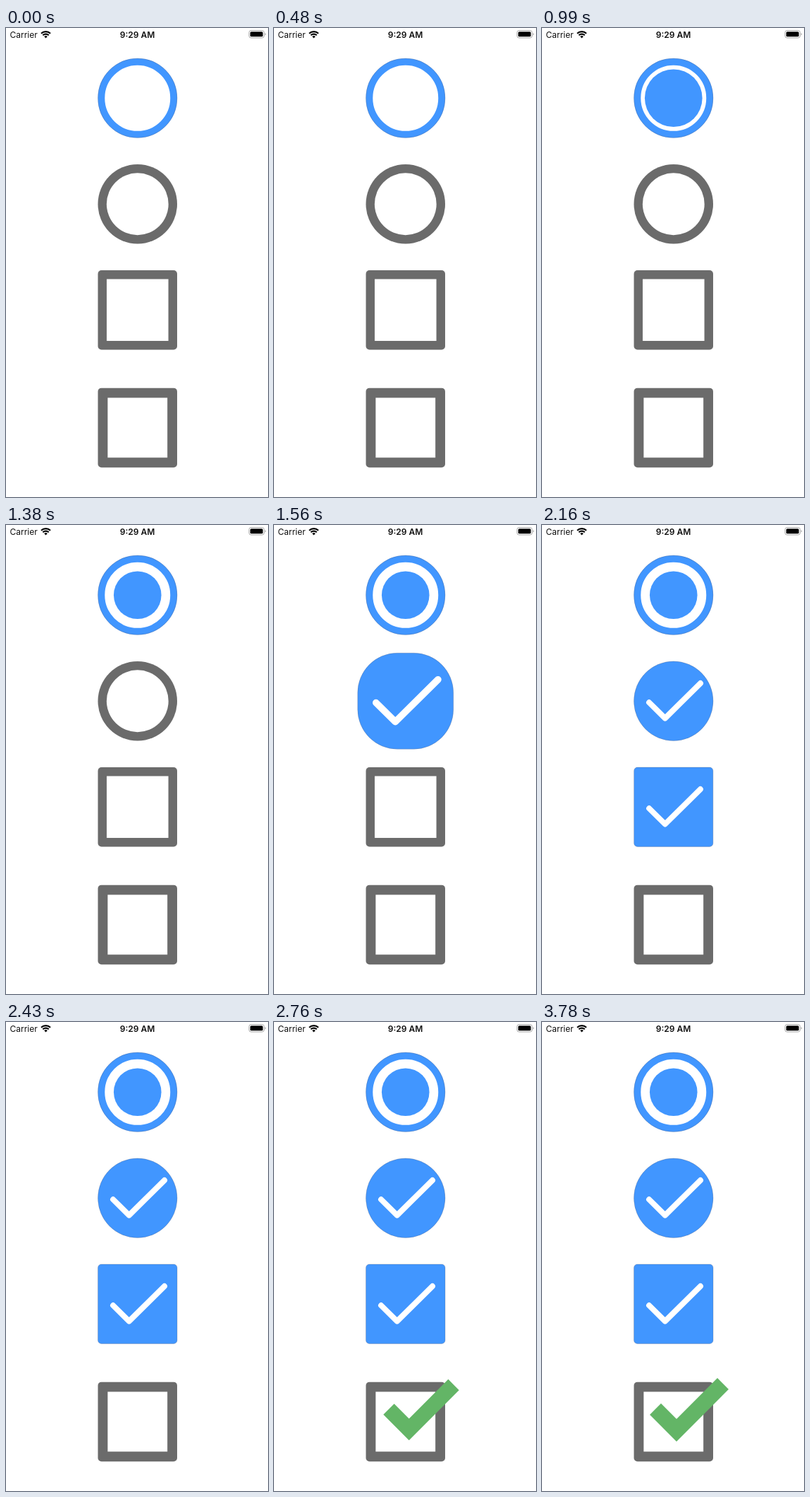
Write an HTML page that moves like this. It is 372 px wide and 664 px high and loops after 3.81 s.

```html
<!DOCTYPE html>
<html lang="en">
<head>
<meta charset="utf-8">
<title>Checkboxes</title>
<style>
  html, body { margin: 0; width: 100%; height: 100%; overflow: hidden; background: #fff; }
  svg { display: block; width: 372px; height: 664px; }
  text { font: 12px Inter, "Liberation Sans", sans-serif; fill: #111; }
  .gray { fill: #6b6b6b; }
  .blue { fill: #4196ff; }
  .edge { stroke: #556; stroke-opacity: .45; stroke-width: .6; }
  .tick { fill: none; stroke: #fff; stroke-width: 8; stroke-linecap: round; stroke-linejoin: round; }
</style>
</head>
<body>
<svg viewBox="0 0 372 664">
  <text x="5.5" y="13.5">Carrier</text>
  <text x="186.5" y="13.5" text-anchor="middle" font-weight="600" style="font-weight:600">9:29 AM</text>
  <g fill="none" stroke="#000" stroke-width="2.2">
    <path d="M50 7.8A9.2 9.2 0 0 1 63 7.8M52.3 10.3A6 6 0 0 1 60.7 10.3"/>
    <path d="M56.5 14.4L54.2 12A3.3 3.3 0 0 1 58.8 12Z" fill="#000" stroke="none"/>
  </g>
  <rect x="345" y="3.5" width="21.5" height="10.5" rx="3" fill="none" stroke="#aaa"/>
  <rect x="346.7" y="5.2" width="18" height="7.1" rx="1.6"/>
  <path d="M367.8 7v3.6q1.4-.5 1.4-1.8t-1.4-1.8z" fill="#aaa"/>

  <g transform="translate(186.75 99.25)">
    <circle r="51.4" fill="none" stroke="#4196ff" stroke-width="9.8"/>
    <circle r="56.2" fill="none" class="edge"/>
    <circle id="dot" class="blue" r="33.8"/>
  </g>

  <g transform="translate(186.75 249.25)">
    <g class="off"><circle class="gray" r="56.25"/><circle r="43.9" fill="#fff"/></g>
    <g class="on"><rect class="blue edge" rx="56.25"/><path class="tick" d="M-34.7 2L-12 24.3L38.2-25.2"/></g>
  </g>

  <g transform="translate(186.75 399.25)">
    <g class="off"><rect class="gray" x="-56.25" y="-56.25" width="112.5" height="112.5" rx="5"/><path d="M-43.8-43.8h87.6v87.6h-87.6z" fill="#fff"/></g>
    <g class="on"><rect class="blue edge" rx="5"/><path class="tick" d="M-34.7 2L-12 24.3L38.2-25.2"/></g>
  </g>

  <g transform="translate(186.75 565.9)">
    <rect class="gray" x="-56.25" y="-56.25" width="112.5" height="112.5" rx="5"/>
    <path d="M-42.4-42.4h84.8v84.8h-84.8z" fill="#fff"/>
  </g>
  <g transform="translate(209 549.2)">
    <path id="bigTick" d="M-48-1.2L-18 28.8L48-37.2" fill="none" stroke="#63b566" stroke-width="22.6"/>
  </g>
</svg>
<script>
  const LOOP = 3810, SIZE = 112.5;
  const dot = document.getElementById('dot');
  const bigTick = document.getElementById('bigTick');
  const offs = document.querySelectorAll('.off');
  const ons = document.querySelectorAll('.on');

  // [time, scale] of the bounce after a tap
  const bounce = [[0, 1], [100, 1.4], [220, 0.9], [340, 1]];

  function scaleAt(t) {
    for (let i = 1; i < bounce.length; i++) {
      const [t0, a] = bounce[i - 1], [t1, b] = bounce[i];
      if (t < t1) return a + (b - a) * (1 - Math.cos(Math.PI * (t - t0) / (t1 - t0))) / 2;
    }
    return 1;
  }

  function show(el, visible) {
    el.style.display = visible ? '' : 'none';
  }

  function popMark(el, t) {
    show(el, t >= 0);
    el.setAttribute('transform', `scale(${scaleAt(t)})`);
  }

  // The box grows while its corner radius stays fixed.
  function popBox(i, t) {
    const [box, tick] = ons[i].children;
    const side = SIZE * scaleAt(t);
    show(offs[i], t < 0);
    show(ons[i], t >= 0);
    for (const key of ['x', 'y']) box.setAttribute(key, -side / 2);
    for (const key of ['width', 'height']) box.setAttribute(key, side);
    popMark(tick, t);
  }

  function draw(now) {
    const t = now % LOOP;
    popMark(dot, t - 840);
    popBox(0, t - 1410);
    popBox(1, t - 1976);
    popMark(bigTick, t - 2568);
    requestAnimationFrame(draw);
  }
  draw(0);
</script>
</body>
</html>
```
